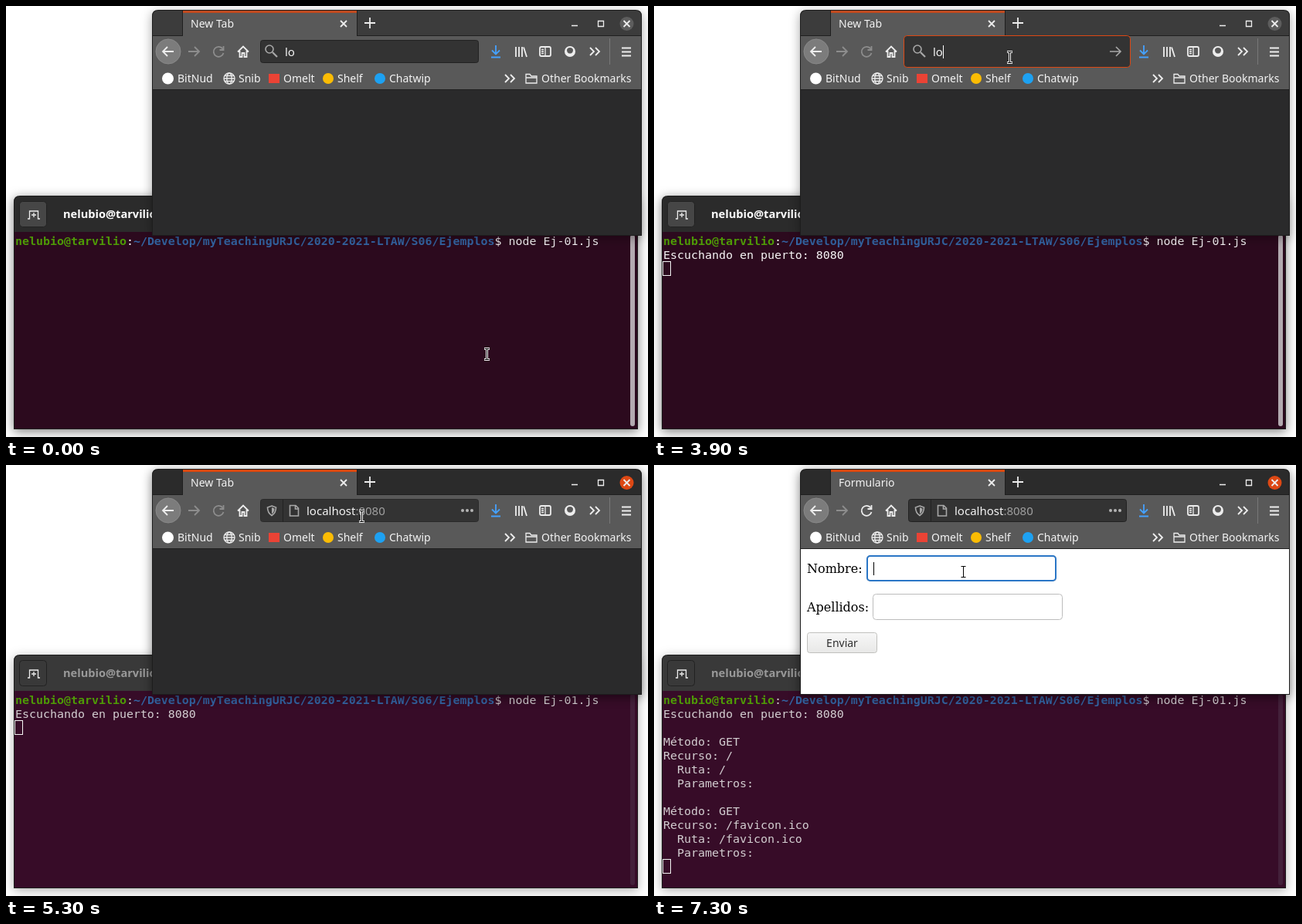
Animation of 831x559 px, one loop 8000 ms. Source, as an HTML page:

```html
<!DOCTYPE html>
<html lang="es">
<head>
<meta charset="utf-8">
<title>Formulario</title>
<style>
html, body { margin: 0; width: 100%; height: 100%; overflow: hidden; background: #fff; }
svg { display: block; width: 831px; height: 559px; --p: 0; --k: calc(var(--p) * 100%); }
text { font: 14px "Noto Sans", "Open Sans", sans-serif; fill: #f4f4f4; white-space: pre; }
.url text { font-size: 15px; }
.b { font-size: 14.67px; font-weight: 700; }
.mono text { font: 14.95px "DejaVu Sans Mono", monospace; fill: color-mix(in srgb, #f7f5f6, #d3ced1 var(--k)); }
.mono .user { font-weight: 700; fill: #4e9a06; }
.mono .path { font-weight: 700; fill: #3465a4; }
.page text { font: 16px "DejaVu Serif", serif; fill: #000; }
.page .btn { font: 14px "Noto Sans", sans-serif; fill: #2e2e2e; text-anchor: middle; }
.i { fill: none; stroke: #ededed; stroke-width: 1.8; }
.dim { stroke: #8d8d8d; }
.grey { stroke: #a8a8a8; stroke-width: 1.6; }
.thin { stroke-width: 1.3; }
.termWin { fill: #1c1c1c; filter: drop-shadow(0 3px 7px rgb(0 0 0 / calc(.5 - .2 * var(--p)))); }
.termBar { fill: color-mix(in srgb, #2b2b2b, #393939 var(--k)); }
.termBody { fill: color-mix(in srgb, #2c0a1e, #370c28 var(--k)); }
.newTab { fill: color-mix(in srgb, #464646, #393939 var(--k)); stroke: #222; }
.termTitle { font-size: 14.6px; font-weight: 700; fill: color-mix(in srgb, #fff, #999 var(--k)); }
.thumb { fill: color-mix(in srgb, #b3aab0, #43203a var(--k)); }
.webWin { fill: #1d1d1d; filter: drop-shadow(0 3px 7px rgb(0 0 0 / calc(.35 + .15 * var(--p)))); }
.webBar { fill: color-mix(in srgb, #3c3c3c, #2b2b2b var(--k)); }
.tabLine { fill: color-mix(in srgb, #c04a1f, #d9480f var(--k)); }
.close { fill: color-mix(in srgb, #5d5d5d, #dd4814 var(--k)); }
.hot { fill: #dd4814; }
.box { fill: #333; stroke: #dd4814; }
.field { fill: #fff; stroke: #bcbcbc; }
</style>
</head>
<body>
<svg viewBox="0 0 831 559">
  <defs>
    <clipPath id="webClip"><path d="M190 297V13q0-7 7-7H815q7 0 7 7V297z"/></clipPath>
    <clipPath id="tabClip"><path d="M230 10H454V39H230z"/></clipPath>
    <clipPath id="listClip"><path d="M330 80H611V297H330z"/></clipPath>
    <linearGradient id="btnFill" x2="0" y2="1"><stop stop-color="#f7f7f7"/><stop offset="1" stop-color="#e8e8e7"/></linearGradient>
    <g id="globe"><circle r="7"/><ellipse rx="3.2" ry="7"/><path d="M-7 0H7M-6-3.5H6M-6 3.5H6"/></g>
    <g id="clock"><circle r="7"/><path d="M0-4V0.5H4"/></g>
    <g id="lens"><circle cx="-2" cy="-2" r="5"/><path d="M2 2L8 8" stroke-width="2.2"/></g>
    <path id="arrow" d="M-7 0H7M1-6L7 0L1 6"/>
    <path id="cross" d="M-4-4L4 4M4-4L-4 4"/>
    <path id="more" d="M-6-5L-1 0L-6 5M1-5L6 0L1 5"/>
  </defs>

  <path class="termWin" d="M10 549V254q0-8 8-8H810q8 0 8 8V549z"/>
  <path class="termBar" d="M11 293V254q0-7 7-7H810q7 0 7 7V293z"/>
  <rect class="newTab" x="17.5" y="253.5" width="35" height="33" rx="4"/>
  <path class="i thin" d="M28 276H30.500V266H41.500V276H44M36 268V274M33 271H39"/>
  <text class="termTitle" x="74" y="275">nelubio@tarvilio: ~/Develop</text>
  <path class="termBody" d="M11 293H817V548H11z"/>
  <rect class="thumb" x="808" y="297" width="6" height="248" rx="3"/>
  <g class="mono">
    <text x="12" y="310"><tspan class="user">nelubio@tarvilio</tspan>:<tspan class="path">~/Develop/myTeachingURJC/2020-2021-LTAW/S06/Ejemplos</tspan>$ node Ej-01.js</text>
    <g id="out"></g>
    <rect id="cursor"/>
  </g>

  <path class="webWin" d="M189 298V13q0-8 8-8H815q8 0 8 8V298z"/>
  <g clip-path="url(#webClip)">
    <path class="webBar" d="M190 6H822V39H190z"/>
    <path fill="#1f1f1f" d="M190 38H822V39H190zM228 6H455V39H228z"/>
    <path fill="#595959" d="M229 6H454V39H229zM190 39H822V108H190z"/>
    <path class="tabLine" d="M229 6H454V9H229z"/>
    <g clip-path="url(#tabClip)"><circle id="burst" cx="247" cy="24" fill="#2f7de0"/></g>
    <text id="tab" y="28"></text>
    <use href="#cross" class="i" x="437" y="23"/>
    <path class="i" d="M464 22H478M471 15V29"/>
    <path class="i thin" d="M732 25.500H740M766.500 19.500H773.500V26.500H766.500z"/>
    <circle class="close" cx="803.500" cy="23" r="9"/>
    <use href="#cross" class="i" x="803.500" y="23"/>

    <circle cx="210" cy="59" r="16" fill="#7c7c7c" stroke="#8a8a8a"/>
    <use href="#arrow" class="i" transform="translate(210 59) scale(-1 1)"/>
    <use href="#arrow" class="i dim" x="243" y="59"/>
    <path id="reload" class="i" d="M280.500 55.500A6.500 6.500 0 1 0 281.500 61M281.500 52V57H276.500"/>
    <path class="i" d="M300 59.500L307 52.500L314 59.500M302.500 58V66H305.500V61H308.500V66H311.500V58"/>
    <path class="i" style="stroke:#45a1ff" d="M634 51V62M629 57.500L634 62.500L639 57.500M628 66.500H640"/>
    <path class="i" d="M660 53V66M664 53V66M668 53V66M670 53.500L674 66"/>
    <rect class="i" x="691" y="53" width="14" height="12" rx="2"/>
    <path class="i thin" d="M698 53V65M693 56.500H696M693 59H696M693 61.500H696"/>
    <circle cx="730" cy="59" r="7" fill="#ededed"/>
    <path fill="#595959" d="M726 57.500q0-3.500 4-3.500t4 3.500q0 3-2.500 4h-3q-2.500-1-2.500-4z"/>
    <use href="#more" class="i" x="762" y="59"/>
    <path stroke="#777" d="M781.500 42V76"/>
    <path class="i" d="M797 54.500H809M797 59.500H809M797 64.500H809"/>

    <circle cx="209.500" cy="94" r="7.500" fill="#fff"/>
    <text x="222" y="99">BitNud</text>
    <use href="#globe" class="i thin" x="289" y="94"/>
    <text x="301" y="99">Snib</text>
    <rect x="340" y="88" width="14" height="12" fill="#ea4335"/>
    <text x="359" y="99">Omelt</text>
    <circle cx="417" cy="94" r="7" fill="#fbbc04"/>
    <text x="429" y="99">Shelf</text>
    <circle cx="484" cy="94" r="7" fill="#1da1f2"/>
    <text x="496" y="99">Chatwip</text>
    <use href="#more" class="i" x="652" y="94"/>
    <path class="i thin" d="M673 100V88.500H678L680 91H687V100zM673 93H687"/>
    <text x="693" y="99">Other Bookmarks</text>
    <path fill="#1f1f1f" d="M190 108H822V109H190z"/>
    <path fill="#2a2a2b" d="M190 109H822V297H190z"/>

    <g class="page" id="page">
      <path fill="#fff" d="M190 109H822V297H190z"/>
      <text x="198" y="140">Nombre:</text>
      <rect class="field" x="275.500" y="117.500" width="245" height="33" rx="4"/>
      <g id="focus">
        <rect x="276" y="118" width="244" height="32" rx="4" fill="none" stroke="#2a76c6" stroke-width="2"/>
        <path stroke="#000" d="M284.500 126V143"/>
      </g>
      <text x="198" y="190">Apellidos:</text>
      <rect class="field" x="283.500" y="167.500" width="245" height="33" rx="4"/>
      <rect x="198.500" y="217.500" width="90" height="26" rx="3" fill="url(#btnFill)" stroke="#c0c0bd"/>
      <text class="btn" x="243.500" y="236">Enviar</text>
    </g>

    <g class="url">
      <rect id="bar" x="329.500" y="44.500" width="282" height="29" rx="3" fill="#333"/>
      <rect id="wide" class="box" x="323.500" y="38.500" width="293" height="41" rx="4"/>
      <g id="list">
        <rect class="box" x="322.500" y="37.500" width="296" height="300" rx="4"/>
        <path stroke="#222" d="M330 79.500H611"/>
        <rect class="hot" x="330" y="87" width="281" height="30" rx="2"/>
        <use href="#globe" class="i thin" x="344" y="102.500" style="stroke:#fff"/>
        <text x="361" y="108"><tspan class="b">lo</tspan>calhost:8080</text>
        <path stroke="#f3b79f" d="M469 103.500H485"/>
        <text x="491" y="108" style="font-size:13px">Visit</text>
        <g id="hints" clip-path="url(#listClip)"></g>
        <circle cx="344" cy="282" r="7.500" fill="#0b0b0b"/>
        <path fill="#2a9df4" stroke="#fff" d="M346.500 285.500H353.500V289.500H355V292.500H345V289.500H346.500z"/>
        <path class="hot" d="M374 51H469V69H374z"/>
      </g>
      <g id="search">
        <use href="#lens" class="i grey" x="343" y="58"/>
        <text id="query" x="361" y="65"></text>
      </g>
      <path id="caret" stroke="#fff" d="M374.500 51V68"/>
      <use id="go" href="#arrow" class="i grey" x="597" y="59"/>
      <g id="site">
        <path class="i grey" d="M344 53L349.500 55Q349.500 62 344 65.500Q338.500 62 338.500 55z"/>
        <path fill="#a8a8a8" d="M344 55L347.500 56.500Q347.500 61 344 63.500z"/>
        <path stroke="#222" d="M358.500 45V74"/>
        <path class="i grey" d="M367.500 52.500H375L378.500 56V66H367.500zM374.500 53V57H378.500"/>
        <text x="389" y="65">localhost<tspan fill="#a0a0a0">:8080</tspan></text>
        <g fill="#b4b4b4"><circle cx="591" cy="59" r="2"/><circle cx="597" cy="59" r="2"/><circle cx="603" cy="59" r="2"/></g>
      </g>
    </g>
  </g>

  <g id="mouse">
    <g id="beam" fill="none" transform="translate(.5 .5)">
      <path stroke="#fff" stroke-width="3" d="M-3.500-7H3.500M0-7V7M-3.500 7H3.500"/>
      <path stroke="#000" d="M-3-7H3M0-7V7M-3 7H3"/>
    </g>
    <path id="tip" d="M.5.5V16.500L4.300 13L7 19.300L9.600 18.200L7 12H11.800z" fill="#1b1b1b" stroke="#fff"/>
  </g>
</svg>
<script>
const LOOP = 8000, STEP = 100;
const $ = id => document.getElementById(id);
const show = (id, on) => $(id).style.display = on ? '' : 'none';
const set = (id, attrs) => { for (const k in attrs) $(id).setAttribute(k, attrs[k]); };
const ramp = (t, a, b) => Math.min(1, Math.max(0, (t - a) / (b - a)));
const smooth = k => k * k * k * (10 - 15 * k + 6 * k * k);

// Terminal output, one entry per row below the prompt
const request = path => ['', 'Método: GET', 'Recurso: ' + path, '  Ruta: ' + path, '  Parametros:'];
const rows = ['Escuchando en puerto: 8080', ...request('/'), ...request('/favicon.ico')];
$('out').innerHTML = rows.map((s, i) => `<text x="12" y="${328 + 18 * i}">${s}</text>`).join('');

const hints = [
  ['lo', 's 52 melodiosos internet'],
  ['lo', 've fpga bitnud'],
  ['lo', 's 52 meloidosos internet'],
  ['lo', 'go javascript'],
  ['fieldset - HTML: Lenguaje de etiquetas', '']
];
$('hints').innerHTML = hints.map(([a, b], i) => {
  const y = 139 + 36 * i;
  const icon = b ? `<use href="#clock" class="i grey" x="344" y="${y}"/>` : '';
  return `${icon}<text x="361" y="${y + 5}">${a}<tspan class="b">${b}</tspan></text>`;
}).join('');

// The hand moves up to the address bar, down to the form, then nudges left
function pointer(t) {
  if (t < 2700) return [622, 451];
  const up = (end) => smooth(ramp(t, 2700, end));
  const down = smooth(ramp(t, 6300, 6600)), left = ramp(t, 6700, 6800);
  return [
    613 - 153 * up(3600) - 42 * down - 18 * left,
    449 - 383 * up(3720) + 70 * down + 2 * left
  ];
}

function drawTerminal(t) {
  const count = t < 2100 ? 0 : t < 5400 ? 1 : rows.length;
  [...$('out').children].forEach((row, i) => row.style.display = i < count ? '' : 'none');
  const blurred = t >= 3700;
  const off = t < 100 || (t >= 800 && t < 1400) || (t >= 2600 && t < 3200);
  const y = 296 + 18 * (count && count + 1);
  show('cursor', blurred || !off);
  set('cursor', blurred
    ? { x: 11.5, y: y - .5, width: 10, height: 18, fill: 'none', stroke: '#f4f4f4' }
    : { x: count ? 12 : 777, y, width: 9, height: 17, fill: '#fff', stroke: 'none' });
}

function drawBrowser(t) {
  const sent = t >= 5300, loaded = t >= 5400, editing = t >= 3700 && !sent, open = t >= 4100 && !sent;
  show('page', loaded);
  show('site', sent);
  show('search', !sent);
  show('wide', editing && !open);
  show('list', open);
  show('go', editing);
  show('caret', editing && !open);
  show('focus', t >= 7300);
  $('query').textContent = open ? 'localhost:8080/' : 'lo';
  $('reload').classList.toggle('dim', !loaded);
  set('bar', { stroke: t >= 3600 && t < 6400 ? '#2a2a2a' : '#222' });

  $('tab').textContent = loaded ? 'Formulario' : 'New Tab';
  set('tab', { x: loaded && t < 5800 ? 261 : 239 });
  const grow = 1 - (1 - ramp(t, 5360, 5740)) ** 2;   // ring of light when loading ends
  show('burst', loaded);
  set('burst', { r: 7 + 260 * grow, opacity: .6 * (1 - grow) });
}

function drawMouse(t) {
  const [x, y] = pointer(t);
  const overText = y > 297 || (y > 44 && y < 75) || (t >= 5400 && y > 117);
  show('mouse', t < 2000 || t >= 2800);
  show('beam', overText);
  show('tip', !overText);
  set('mouse', { transform: `translate(${Math.round(x)} ${Math.round(y)})` });
}

function frame(now) {
  // Ten steps a second, as in a screen capture; the lead absorbs the delay of a display frame
  const t = Math.floor((now + 17) / STEP) * STEP % LOOP;
  document.querySelector('svg').style.setProperty('--p', ramp(t, 3900, 4200));
  drawTerminal(t);
  drawBrowser(t);
  drawMouse(t);
  requestAnimationFrame(frame);
}
requestAnimationFrame(frame);
</script>
</body>
</html>
```
